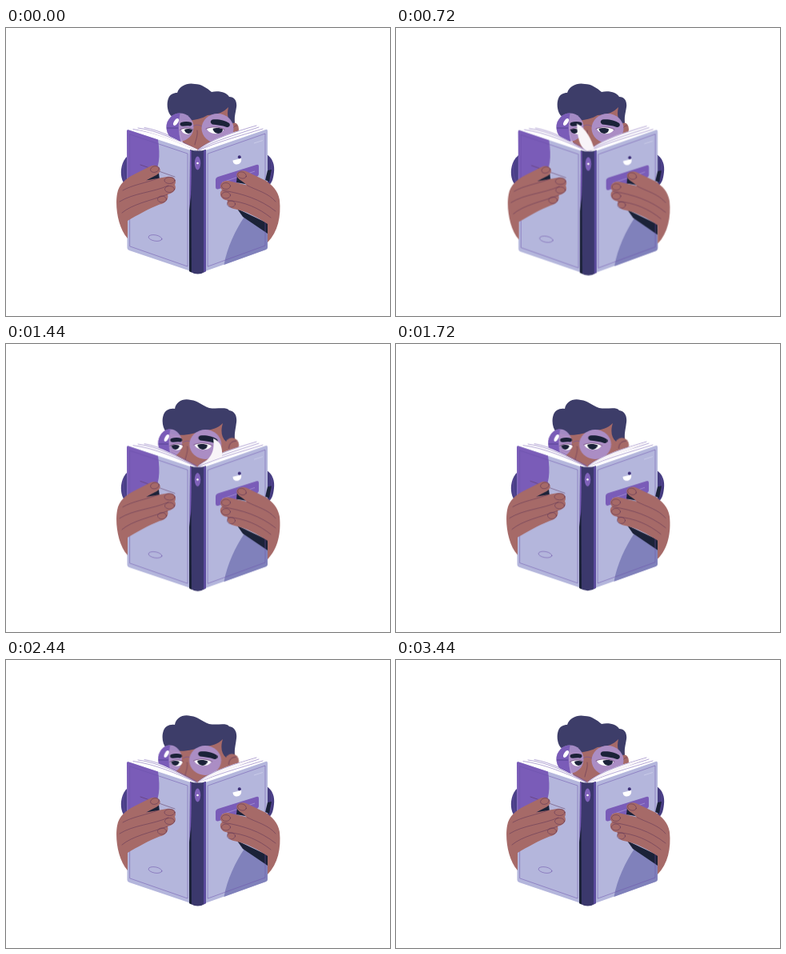
An HTML page that plays this animation: 480 by 360 pixels, repeating every 3.48 s.

```html
<!DOCTYPE html>
<html lang="en">
<head>
<meta charset="utf-8">
<title>Reader</title>
<style>
  html, body { margin: 0; width: 100%; height: 100%; overflow: hidden; background: #fff; }
  svg { display: block; width: 480px; height: 360px; }

  .skin { fill: #a66a68; }
  .hair { fill: #3d3d69; }
  .dark { fill: #1b2238; }
  .cover { fill: #b4b6dc; }
  .violet { fill: #7a5cb8; }
  .white { fill: #fff; }
  .glass { fill: #ac91cd; fill-opacity: .92; }
  .line { fill: none; stroke: #6b50aa; stroke-width: .5; stroke-linecap: round; stroke-linejoin: round; }
  .crease { fill: none; stroke: #593055; stroke-width: .5; stroke-linecap: round; }

  .hair, .face, .lens, .pupils, .ear, .book, .leaf {
    animation: 3480ms ease-in-out infinite;
  }
  .face { animation-name: face; --shift: -12.5px; }
  .face.near { --shift: -15.5px; }
  .hair { animation-name: hair; }
  .lens { animation-name: lens; transform-origin: 217.5px 124px; }
  .pupils { animation-name: look; }
  .ear { animation-name: ear; transform-origin: 289px 127px; }
  .book { animation-name: book; transform-origin: 327px 128px; }
  .leaf { animation-name: leaf; animation-timing-function: linear; }

  @keyframes face {
    0%, 24%, 98.5%, 100% { transform: none; }
    43%, 76% { transform: translate(var(--shift), 0); }
  }
  @keyframes lens {
    0%, 24%, 98.5%, 100% { transform: none; }
    43%, 76% { transform: scaleX(.88); }
  }
  @keyframes ear {
    0%, 24%, 98.5%, 100% { transform: none; }
    43%, 76% { transform: translate(-1px, 0) scale(1.6, 1.15); }
  }
  @keyframes look {
    0%, 13%, 98.5%, 100% { transform: none; }
    18%, 22% { transform: translate(-5px, 0); }
    43%, 76% { transform: translate(-4px, 0); }
  }
  @keyframes hair {
    0%, 24%, 98.5%, 100% {
      d: path("M209 112 C202 108 200 96 203 88 C205 83 209 81 214 81 C217 72 227 68 236 70 C244 70 251 75 257 80 C267 78 276 81 279 86 C286 86 289 92 288 99 C287 106 285 111 286 120 L282 119 C277 114 276 108 278 99 C272 105 266 108 252 109 C242 115 222 119 209 112 Z");
    }
    43%, 76% {
      d: path("M200 110 C196 105 194 96 197 88 C199 83 204 80 211 81 C212 72 222 67 231 70 C240 71 245 77 254 80 C264 82 275 78 279 83 C286 84 289 90 288 98 C287 107 285 112 286 121 L275 122 C269 117 268 108 271 99 C265 105 257 108 245 108 C234 113 215 117 200 110 Z");
    }
  }
  @keyframes book {
    0%, 8%, 62%, 100% { transform: none; }
    17%, 26% { transform: translate(0, .6px) scale(.991, 1.007); }
    41.4% { transform: translate(0, .3px) scale(1, 1.006); }
  }
  @keyframes leaf {
    0%, 13%, 100% {
      d: path("M238 153 C220 146 190 132 160 126 C185 129 215 140 240 152 Z");
    }
    20.7% {
      d: path("M238 153 C230 149 226 141 225 119 C236 124 244 139 247 151 Z");
    }
    41.4% {
      d: path("M240 152 C252 146 262 138 259 118 C268 122 271 128 270 140 Z");
    }
    48%, 99.9% {
      d: path("M240 153 C252 145 285 129 313 123 C300 130 262 142 242 153 Z");
    }
  }
</style>
</head>
<body>
<svg viewBox="0 0 480 360" xmlns="http://www.w3.org/2000/svg">
  <defs>
    <clipPath id="side"><path d="M198 105 H218 C215 118 215 128 219 145 H198 Z"/></clipPath>
  </defs>

  <!-- sleeves -->
  <path fill="#4a4088" d="M156 157 C146 163 143 174 144 184 C145 192 148 197 156 200 Z"/>
  <path fill="#453c80" d="M324 157 C334 162 336 172 335 180 C334 190 332 196 324 200 Z"/>
  <path class="line" d="M147 169 C146 178 147 186 150 192 M332 166 C333 174 332 182 330 188"/>

  <!-- head -->
  <path class="skin" d="M225 98 H283 L286 118 L287 148 L238 160 L222 150 Z"/>
  <path class="face skin" d="M217 104 H270 V150 L238 160 C222 152 214 136 217 104 Z"/>
  <path class="hair" d="M209 112 C202 108 200 96 203 88 C205 83 209 81 214 81 C217 72 227 68 236 70 C244 70 251 75 257 80 C267 78 276 81 279 86 C286 86 289 92 288 99 C287 106 285 111 286 120 L282 119 C277 114 276 108 278 99 C272 105 266 108 252 109 C242 115 222 119 209 112 Z"/>
  <g class="ear">
    <ellipse class="skin" cx="285.5" cy="126.5" rx="5.5" ry="8"/>
    <path class="crease" d="M283 130 C283 124 286 122 288.5 122"/>
  </g>
  <g class="face">
    <g class="lens">
      <ellipse class="glass" cx="217.5" cy="124" rx="17" ry="17.5"/>
      <ellipse class="violet" cx="217.5" cy="124" rx="17" ry="17.5" clip-path="url(#side)"/>
      <path d="M201 125 H215" stroke="#4a3a86" stroke-width=".8"/>
      <ellipse class="white" cx="212.5" cy="117.5" rx="2.5" ry="5" transform="rotate(32 212.5 117.5)"/>
    </g>
    <path class="line" d="M234 123 C237 120 242 121 245 123"/>
    <path class="crease" d="M239 128 C240 135 237 140 236 146"/>
    <path class="white" d="M219 127 C223 125 229 125 233 127 C233 134 221 135 219 127 Z"/>
    <path class="dark pupils" d="M223 127 C226 125.500 230 125.500 233 127 C233 133 224 134 223 127 Z"/>
    <path class="crease" d="M217 127.500 C222 124 230 124 234 127"/>
    <path class="dark" d="M219 118 C223 116.500 228 116.500 231.500 118 C233.500 120 232.500 122.500 229.500 122.500 C225 122 222 123 219 122.500 C217 121 217 119 219 118 Z"/>
  </g>
  <g class="face near">
    <ellipse class="glass" cx="264.500" cy="125.500" rx="20" ry="18.500"/>
    <path class="white" d="M251 126 C256 123.500 267 123.500 272 127 C270 134 254 134 251 126 Z"/>
    <path class="dark pupils" d="M258.500 126 C262 124.500 268 124.500 271 126.500 C271 133.500 260 134 258.500 126 Z"/>
    <path class="crease" d="M250 126 C256 123 267 123 273 127"/>
    <path class="dark" d="M258 114.500 C265 113.500 274 115.500 279 119 C281 121.500 279 124.500 276 124 C270 121.500 264 121.500 258 120.500 C255 119 255 115.500 258 114.500 Z"/>
  </g>

  <g class="book">
    <!-- pages -->
    <path class="white" d="M154 128 C160 124 170 123 177 125 C192 128 213 139 239 153 V162 Z"/>
    <path class="white" d="M239 153 C254 140 282 130 313 122 L316 124 L325 127 L248 160 Z"/>
    <path class="line" d="M159 126.500 C186 130 213 142 238 153 M165 125 C190 128 215 141 238 152.500 M173 124.500 C194 128 216 140 238 151.500
      M240 151.500 C258 139 285 130 313 122 M240 152.500 C260 141 288 133 316 124 M241 153 C262 143 292 135 321 126"/>
    <path class="leaf" fill="#f8f4f8" d="M238 153 C220 146 190 132 160 126 C185 129 215 140 240 152 Z"/>

    <!-- left cover -->
    <path class="cover" d="M151 129 Q151 126.500 153.500 127.500 L231 153 V304 L154 278 Q151.500 277 151.500 275 Z"/>
    <path class="violet" d="M151 129 Q151 126.500 153.500 127.500 L190 139.500 C193 160 192 176 182 188 L151.500 202 Z"/>
    <path class="line" d="M155 133 L227 157 V298 L155 273 Z"/>
    <path class="crease" d="M168 171 L211 186"/>
    <ellipse class="line" cx="186.500" cy="262.500" rx="8.500" ry="3.700" transform="rotate(10 186.500 262.500)"/>

    <!-- right cover -->
    <path class="cover" d="M249 153 L324.500 127 Q327 126 327 129 V274 Q327 276 325 277 L249 304 Z"/>
    <path fill="#8081bb" d="M272.500 296 C276 275 287 252 298 236 L327 250 V274 Q327 276 325 277 Z"/>
    <path class="dark" d="M289 226 L327 244 V257 L296 236 Z"/>
    <path class="dark" d="M327 178 L332 177 L329 192 L324 190 Z"/>
    <path class="line" d="M252.500 157 L324 132 V272 L252.500 298 Z"/>
    <path class="violet" d="M265 186 L313 171 Q316 170 316 173 V182 Q316 185 313 186 L265 201.500 Q262 202 262 199 V190 Q262 187 265 186 Z"/>
    <path d="M270 193 L311 179" stroke="#b4a5dc" stroke-width=".6"/>
    <path class="white" d="M283.500 165.500 L294 163 C295 167.500 292 170.500 288.500 170.500 C285.500 170.500 283.500 168.500 283.500 165.500 Z"/>
    <circle cx="291.800" cy="161.300" r="2" fill="#3d2f78"/>
    <path d="M310 144 L321 140.500" stroke="#d8d8f0" stroke-width=".6"/>

    <!-- spine -->
    <path fill="#3b386c" d="M230 152 Q240 155 250 152 V304 Q240 311 229 304 Z"/>
    <path class="violet" d="M230 153 H231.500 C232 185 231.500 207 229.500 228 Z"/>
    <path class="dark" d="M231.500 208 L232 305.500 L229 304 V228 Z"/>
    <path fill="#5a4a9c" d="M247 153 L250 152 V304 L247 305.500 Z"/>
    <ellipse cx="239.500" cy="169" rx="3.700" ry="8.500" fill="#8062bb"/>
    <circle class="white" cx="239.500" cy="169" r="1.300"/>

    <!-- left hand -->
    <path class="dark" d="M174 191 L191 181 L192 189 Z"/>
    <path class="skin" d="M152 263 C140 250 136 223 139 207 C141 195 150 188 160 183 L181 172.500 C188 169.500 195 175 192 180 C190 184 183 186 175 190.500 L201 186 C210 184.500 214 190 211 196 C214 202 209 206 202 208 C204 214 199 219 192 220.500 C178 226 164 234 152 241 Z"/>
    <path class="crease" d="M146 203 C158 196 174 194 190 188 M142 217 C160 206 182 206 203 197 M145 231 C158 220 180 216 202 208"/>
    <g class="crease">
      <ellipse cx="186" cy="176.500" rx="5.500" ry="3.800" transform="rotate(-15 186 176.500)"/>
      <ellipse cx="204.500" cy="190.500" rx="6.500" ry="4"/>
      <ellipse cx="204.500" cy="201.500" rx="6" ry="4"/>
      <ellipse cx="195" cy="214" rx="5.500" ry="4"/>
    </g>

    <!-- right hand -->
    <path class="dark" d="M289 184 L297 188 L304 196 L288 193 Z"/>
    <path class="skin" d="M327 268 C340 255 344 235 342 215 C340 203 333 197 325 191 L301 179.500 C293 176 286 181 289 186 C291 190 297 192 301 196.500 L280 191.500 C270 189 265 197 270 202.500 C265 207 269 215 277 215.500 C275 221 280 225.500 287 226.500 C300 229 315 237 327 245 Z"/>
    <path class="crease" d="M301 196.500 C313 203 328 206 337 217 M271 203 C296 207 318 214 337 229 M277 215.500 C298 217 316 225 331 237"/>
    <g class="crease">
      <ellipse cx="295" cy="184" rx="5.500" ry="4" transform="rotate(18 295 184)"/>
      <ellipse cx="275" cy="197.500" rx="5.500" ry="4"/>
      <ellipse cx="275" cy="209" rx="5.500" ry="4"/>
      <ellipse cx="281.500" cy="220" rx="5" ry="4"/>
    </g>
  </g>
</svg>
</body>
</html>
```
